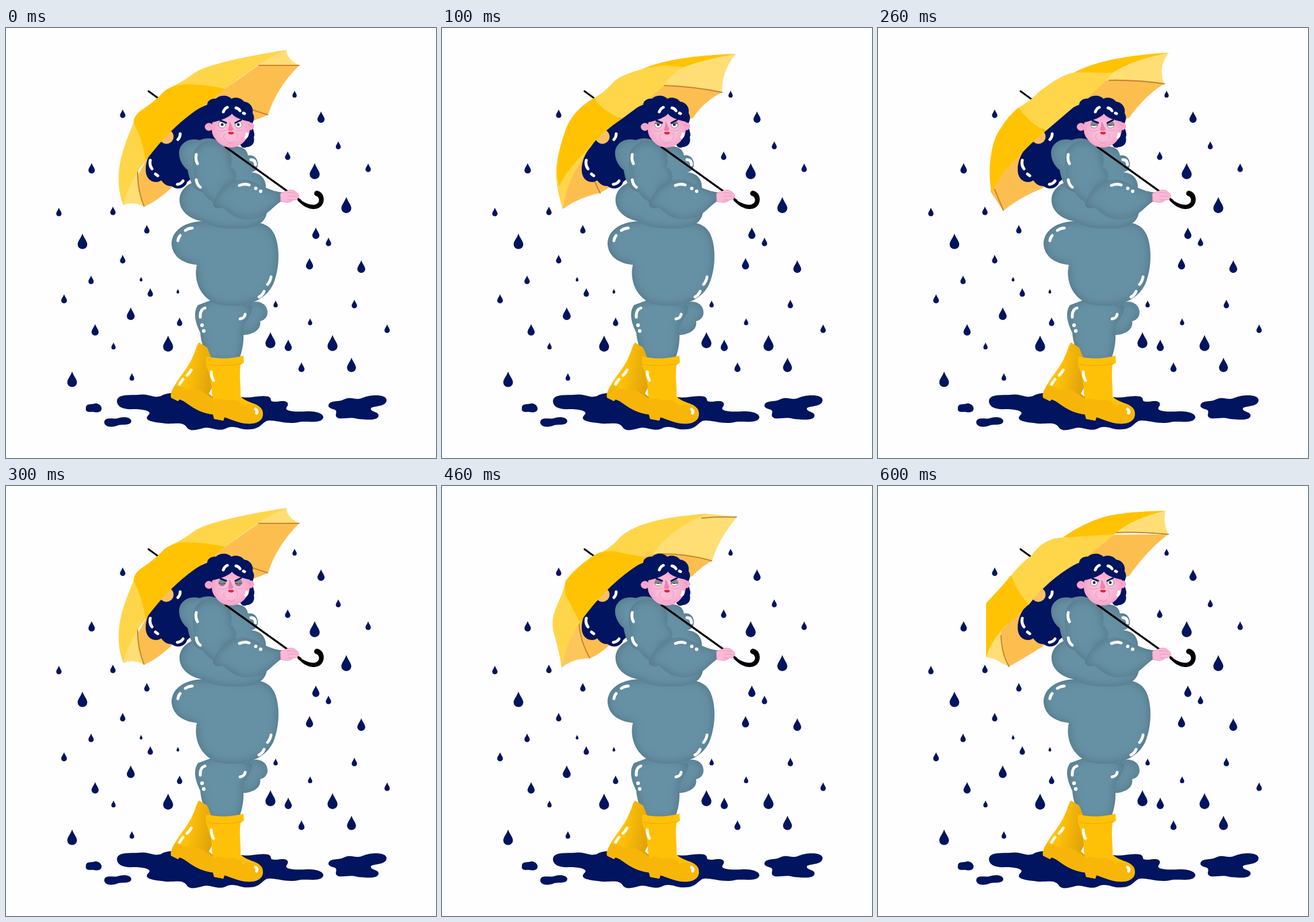
An HTML page for the animation above (0.7 s loop, 748 by 748 pixels).

```html
<!DOCTYPE html>
<html lang="en">
<head>
<meta charset="utf-8">
<title>Walk in the rain</title>
<style>
  html, body { margin: 0; width: 100%; height: 100%; overflow: hidden; background: #fefdff; }
  svg { display: block; width: 100vw; height: 100vh; }
  .navy { fill: #00145f; }
  .coat { fill: #6690a4; filter: url(#soft); }
  .shine { fill: none; stroke: #fff; stroke-width: 5; stroke-linecap: round; stroke-linejoin: round; }
  .rib { fill: none; stroke: #c38531; stroke-width: 2; stroke-linecap: round; }
  .ink { fill: none; stroke: #000; stroke-linecap: round; }
  .crease { fill: none; stroke: #e08bb5; stroke-width: .8; stroke-linecap: round; }
</style>
</head>
<body>
<svg viewBox="0 0 748 748">
  <defs>
    <filter id="soft" color-interpolation-filters="sRGB">
      <feFlood flood-color="#3c5868" flood-opacity=".55"/>
      <feComposite in2="SourceAlpha" operator="out"/>
      <feGaussianBlur stdDeviation="8"/>
      <feComposite in2="SourceAlpha" operator="in" result="shade"/>
      <feMerge><feMergeNode in="SourceGraphic"/><feMergeNode in="shade"/></feMerge>
    </filter>
    <radialGradient id="skin">
      <stop offset=".5" stop-color="#f9bbd8"/><stop offset="1" stop-color="#f4a5cb"/>
    </radialGradient>
    <linearGradient id="bootShade" x1="0" y1="0" x2="1" y2=".25">
      <stop offset=".45" stop-color="#ffc107"/><stop offset="1" stop-color="#dfa20b"/>
    </linearGradient>
    <clipPath id="eyes"><circle cx="376" cy="168" r="6"/><circle cx="404.500" cy="168" r="6"/></clipPath>
  </defs>

  <g id="rain" class="navy"></g>

  <g class="navy">
    <path d="M193 650C193 637 210 639 230 638C249 635 257 645 270 640C280 634 300 633 320 640L409 642C425 645 440 638 456 641C466 645 454 651 472 650C489 647 494 652 488 660C484 667 502 668 521 667C540 666 553 671 552 678C548 688 529 684 512 685C492 690 477 684 462 683C446 680 447 697 425 698C407 700 402 691 386 695C369 705 357 692 343 696C328 700 319 702 314 694C306 683 291 691 270 687C252 685 240 682 247 674C256 667 241 663 222 663C205 664 194 660 193 650Z"/>
    <path d="M139 661C139 652 148 656 155 653C164 653 169 661 165 666C159 671 153 667 146 668C140 668 138 665 139 661Z"/>
    <path d="M171 685C173 676 185 681 194 679C204 675 218 677 218 684C217 692 203 689 195 691C184 696 170 694 171 685Z"/>
    <path d="M561 656C563 647 580 651 588 646C601 640 609 649 621 643C635 637 662 637 662 647C662 659 641 657 635 661C632 668 650 667 648 675C646 684 625 681 612 680C600 676 591 680 579 679C568 675 579 668 572 664C565 662 560 660 561 656Z"/>
  </g>

  <path class="ink" stroke-width="3.200" d="M248 110L270 126"/>
  <g id="inside"></g>
  <path class="navy" d="M360 130C320 143 285 170 258 208C242 225 238 255 250 264C257 270 267 268 270 265C277 275 284 275 288 275C300 284 313 277 315 268L385 210Z"/>
  <circle cx="279" cy="189" r="12.500" fill="#fdbf62"/>
  <g id="canopy"></g>
  <path class="shine" d="M303 184Q303 190 299 194M251 230Q249 239 254 245M260 254L264 257M298 272Q305 271 308 266"/>

  <path class="coat" d="M410 490C424 470 449 473 454 489C458 503 448 509 442 510C445 528 423 535 408 534Z"/>
  <path class="coat" d="M334 482C325 495 329 512 338 530C339 545 345 562 353 581L404 581C412 560 415 541 412 524C414 507 428 504 428 484L380 465Z"/>
  <path class="coat" d="M346 336C310 336 288 353 288 376C290 400 311 410 332 412C326 438 337 469 367 480C403 489 449 480 465 445C476 418 477 382 467 359C459 342 443 338 430 338Z"/>
  <path class="coat" d="M385 208C410 202 419 211 421 222C434 219 442 233 436 245Q433 250 426 251C444 252 453 264 452 279L454 318C453 337 438 349 401 349C374 349 358 346 346 337C316 333 300 315 302 296C304 280 316 273 326 268Z"/>
  <path class="coat" d="M316 247C303 237 297 218 304 206C312 194 325 192 337 195C348 190 363 191 371 198C388 205 397 224 390 244C407 253 403 269 379 276L362 301C350 298 345 290 342 285C327 284 319 266 316 247Z"/>
  <path class="coat" d="M326 223C326 205 350 190 371 200C389 208 394 226 390 242C400 245 404 260 397 269L379 276C380 300 365 315 358 301C350 297 347 289 343 285C329 284 324 270 328 258C325 247 324 235 326 223Z"/>
  <path class="coat" d="M362 302C372 276 395 261 418 264C437 268 454 283 480 286L479 301C462 312 451 332 424 333C402 334 389 323 377 312C367 317 356 310 362 302Z"/>

  <path class="ink" stroke-width="3.400" d="M382 207L512 300"/>
  <path d="M509 297C520 305 531 309 538 307C547 304 546 294 539 292C534 290 536 283 541 283C553 285 556 300 549 309C541 318 527 316 516 308L507 300Z"/>
  <path fill="#fab9d7" stroke="#e988b6" stroke-width=".8" d="M477 288Q486 284 492 282Q502 281 506 287Q510 289 509 294Q507 300 500 299Q494 305 486 303L478 302Z"/>
  <path class="crease" d="M489 287Q498 285 505 289M491 293Q500 291 507 294M490 299L499 299"/>

  <path class="shine" d="M331 220Q329 229 333 236M331 264Q332 273 338 277M406 274Q414 270 423 273M426 229Q434 229 434 238M299 370Q300 364 303 361M312 352Q318 348 324 348M461 433Q460 440 455 446M449 458Q446 465 440 468M346 487Q337 490 338 503M416 498Q415 505 407 506"/>
  <g fill="#fff"><circle cx="434.500" cy="279" r="3"/><circle cx="443" cy="284" r="3"/><circle cx="341" cy="517" r="3.200"/><circle cx="344" cy="527" r="3.200"/></g>

  <path fill="url(#bootShade)" d="M336 547L350 556L364 590V673C337 670 325 660 309 649L302 646L299 649L287 643C285 636 290 628 294 621C303 604 317 592 326 569C331 559 331 552 336 547Z"/>
  <path fill="#f7b50a" d="M294 621C306 622 315 632 327 630C342 628 350 640 364 648V673C337 670 325 660 309 649L302 646L299 649L287 643Q287 631 294 621Z"/>
  <path fill="#fefdff" d="M358 626L353 636L359 641Z"/>
  <path fill="#ffc107" d="M348 571Q379 579 413 570L414 582L408 586C405 606 409 623 408 641C421 654 439 651 446 665C449 676 445 683 434 687C412 692 394 681 380 677L378 683L362 680C357 666 363 651 358 633C358 613 353 599 348 586Z"/>
  <path fill="#f8b609" d="M360 648C372 640 379 650 390 647C400 645 407 650 413 657C424 653 443 655 446 667C448 677 445 683 434 687C412 692 394 681 380 677L378 683L362 680Q358 666 360 648Z"/>
  <path fill="none" stroke="#efae0a" stroke-width="1.500" d="M349 585Q380 590 410 584M331 558L350 567"/>
  <path class="shine" d="M322 595Q318 602 315 604M308 611Q303 617 302 620M357 598Q357 607 361 613M434 663Q438 666 436 670"/>

  <path class="navy" d="M362 181C350 176 347 166 348 158C342 149 344 137 350 134C350 125 360 122 365 123C373 115 387 117 392 123C399 119 410 122 414 128C425 129 431 139 429 148C434 156 430 163 428 168C430 178 434 185 431 190C434 201 426 207 419 207C412 211 407 205 407 199Z"/>
  <g fill="#f5a8cd" stroke="#e78fba" stroke-width=".8"><ellipse cx="353" cy="172" rx="7" ry="6.500"/><ellipse cx="425" cy="171" rx="6" ry="6.500"/></g>
  <path fill="url(#skin)" d="M359 164C374 161 389 155 393 149C398 156 410 160 424 163C425 177 424 187 418 193C412 202 402 208 390 208C377 207 369 200 365 194C357 186 357 174 359 164Z"/>
  <path fill="#ef7fb3" d="M388 163Q392 165 393 171Q398 177 393 179Q387 180 386 176Q389 171 388 163Z"/>
  <path class="crease" d="M350 170Q354 168 357 173M422 169Q426 168 427 172M369 178Q376 182 383 177M399 177Q406 181 412 177M380 184Q376 191 382 195M401 182Q405 188 401 193M384 198Q391 203 398 198"/>
  <path fill="#e6252e" d="M386 182Q389 179.500 391 181Q394 179.500 397 182.500Q394 186 391 185Q388 186 386 182Z"/>
  <g fill="#fff" stroke="#75717d" stroke-width=".9"><circle cx="376" cy="168" r="6"/><circle cx="404.500" cy="168" r="6"/></g>
  <g fill="#343640"><circle cx="376" cy="168" r="2.500"/><circle cx="404" cy="168" r="2.500"/></g>
  <g clip-path="url(#eyes)"><rect id="lid" x="368" y="162" width="45" fill="#8b8792"/></g>
  <path id="lash" fill="none" stroke="#44434e" stroke-width="1"/>
  <path fill="none" stroke="#00145f" stroke-width="3" stroke-linecap="round" d="M373 161L383 165M399 165L409 160"/>
  <path class="shine" d="M378 146Q380 140 385 138M400 139Q405 140 407 144M413 148L415 149M419 184Q420 187 417 190"/>
</svg>

<script>
const FRAME = 100;
const GOLD = '#ffc303', LIGHT = '#ffd54a', PALE = '#ffde75', LINING = '#fdbe50';
const byId = id => document.getElementById(id);

// Inside panels sit behind the hair, canopy panels in front of it and overlap their edges.
const poses = {
  a: {
    inside: [
      [LINING, 'M381 100Q405 78 440 64L510 65Q470 105 456 151Q430 163 400 170L290 276Q262 302 240 311L222 270L260 200Z'],
      [PALE, 'M488 38Q487 53 510 65H440L381 106L400 70Z'],
      [PALE, 'M204 308Q222 300 240 311Q228 280 229 240L205 250Z']
    ],
    ribs: 'M440 65H510M428 142L455 151M229 247Q228 280 240 310',
    canopy: [
      [LIGHT, 'M222 165C205 205 184 255 204 308Q216 262 243 231L260 200Z'],
      [LIGHT, 'M285 104Q310 92 325 80Q350 60 488 38Q432 62 381 106L320 115Z'],
      [GOLD, 'M222 165Q221 152 240 140Q262 125 275 110Q288 100 310 98Q350 98 381 106Q370 115 340 137Q288 170 243 231Q238 195 222 165Z']
    ]
  },
  b: {
    inside: [
      [LINING, 'M380 85L487 112Q455 128 437 156L400 170L290 278L275 287Q237 295 210 315L205 240L260 200Z'],
      [PALE, 'M511 45Q487 73 487 112Q440 100 387 100L370 85L380 62Z']
    ],
    ribs: 'M387 100Q440 102 487 112M266 268L275 287',
    canopy: [
      [LIGHT, 'M207 210C193 244 198 275 210 315Q218 265 243 231L260 200Z'],
      [GOLD, 'M345 73Q395 49 511 45Q445 57 416 70L360 85Z'],
      [LIGHT, 'M264 122Q283 112 300 92Q325 73 385 65L420 68Q392 85 385 101Q370 115 340 138L313 158Q284 147 264 122Z'],
      [GOLD, 'M264 122Q225 145 214 180C202 215 195 245 204 275Q215 250 245 220Q275 183 313 158Q284 147 264 122Z']
    ]
  },
  c: {
    inside: [
      [LINING, 'M375 85L498 97Q465 117 437 156L400 170L288 278Q245 295 218 318L196 285L200 240L260 200Z'],
      [PALE, 'M506 43Q486 68 498 97Q450 89 402 91L380 92V65Z']
    ],
    ribs: 'M402 91Q450 90 498 97M203 281L218 317',
    canopy: [
      [GOLD, 'M340 78Q393 49 506 43Q440 56 408 78L345 95Z'],
      [LIGHT, 'M245 138Q265 127 280 111C300 96 325 78 345 77L408 78Q382 110 340 138L292 179Q263 165 245 138Z'],
      [GOLD, 'M245 138Q226 153 213 175C195 198 190 255 198 287Q214 251 245 223Q268 198 292 179Q263 165 245 138Z']
    ]
  },
  d: {
    inside: [
      [LINING, 'M360 105L440 112L470 130Q453 139 435 157L400 170L290 278Q272 294 257 300L225 250L260 200Z'],
      [PALE, 'M462 48L513 54Q480 94 470 130Q420 117 350 118L400 58Z'],
      ['#fdc65a', 'M208 316Q229 299 257 300Q240 272 238 230L203 245Z']
    ],
    ribs: 'M375 118Q425 117 469 130M452 56Q478 53 512 54M238 235Q240 270 257 299',
    canopy: [
      [LIGHT, 'M215 165C208 205 182 220 197 265Q205 292 208 316Q217 267 242 235L255 205Z'],
      [LIGHT, 'M265 122Q293 109 307 92Q340 56 462 48Q398 73 367 118L342 126Z'],
      [GOLD, 'M215 165Q231 143 265 120Q280 111 300 114L353 124Q354 130 340 138Q286 173 240 237Q226 210 214 187Q213 175 215 165Z']
    ]
  },
  e: {
    inside: [
      [LINING, 'M385 85L505 84Q470 110 437 156L400 170L288 278Q262 295 228 314L205 302L195 270L262 205Z'],
      [PALE, 'M500 43Q495 62 505 84Q453 79 411 83L385 88L400 60Z'],
      [PALE, 'M188 298Q208 300 228 314Q211 287 215 245L190 260Z']
    ],
    ribs: 'M412 81Q455 79 505 84M214 260Q215 292 228 314',
    canopy: [
      [GOLD, 'M322 89Q356 65 395 53Q435 44 500 43Q440 57 411 84L355 94Z'],
      [LIGHT, 'M232 155Q249 134 267 121Q285 94 315 90Q365 87 411 84Q379 113 340 138Q295 164 262 207Q242 184 232 155Z'],
      [GOLD, 'M232 155Q210 181 188 204V298Q199 263 225 241L262 206Q242 184 232 155Z']
    ]
  }
};
const poseOrder = 'abcadce';
const blink = [0, .35, .6, 1, .6, .25, 0];

// Each drop: centre x, centre y, height.
const drops = [
  203,149,15, 502,115,12, 548,155,20, 578,204,14, 490,222,15, 537,249,28, 630,243,15, 149,244,18,
  592,308,28, 92,320,15, 186,318,15, 133,371,27, 245,350,15, 539,357,20, 561,372,15, 203,402,15,
  528,410,20, 618,415,22, 148,438,15, 235,437,8, 251,460,15, 299,458,8, 101,471,16, 217,497,22,
  469,480,12, 606,480,15, 302,511,15, 529,511,12, 155,525,20, 663,523,15, 187,553,12, 282,549,28,
  460,543,28, 491,552,20, 568,548,28, 514,590,17, 601,586,25, 115,611,27, 219,607,13
];

function dropPath(x, y, h) {
  const w = h * .31, top = y - h / 2, low = y + h * .2, r = h * .3;
  return `M${x} ${top}C${x + w * .3} ${top + h * .28} ${x + w} ${y} ${x + w} ${low}` +
    `A${w} ${r} 0 0 1 ${x - w} ${low}C${x - w} ${y} ${x - w * .3} ${top + h * .28} ${x} ${top}Z`;
}

let rain = '';
for (let i = 0; i < drops.length; i += 3) rain += dropPath(...drops.slice(i, i + 3));
byId('rain').innerHTML = `<path d="${rain}"/>`;

const panels = list => list.map(([fill, d]) => `<path fill="${fill}" d="${d}"/>`).join('');
const lid = byId('lid'), lash = byId('lash');
let shown = -1;

function render(time) {
  const step = Math.floor(time / FRAME) % poseOrder.length;
  if (step === shown) return;
  shown = step;
  const pose = poses[poseOrder[step]];
  byId('inside').innerHTML = panels(pose.inside) + `<path class="rib" d="${pose.ribs}"/>`;
  byId('canopy').innerHTML = panels(pose.canopy);

  const closed = blink[step], y = 162 + 12 * closed;
  const half = 6 * Math.sqrt(Math.max(0, 1 - (2 * closed - 1) ** 2));
  lid.setAttribute('height', 12 * closed);
  lash.setAttribute('d', closed === 1
    ? 'M370 169Q376 172 382 169M398.500 169Q404.500 172 410.500 169'
    : `M${376 - half} ${y}h${2 * half}M${404.5 - half} ${y}h${2 * half}`);
}

const start = performance.now();
function tick() {
  render(performance.now() - start);
  requestAnimationFrame(tick);
}
tick();
</script>
</body>
</html>
```
